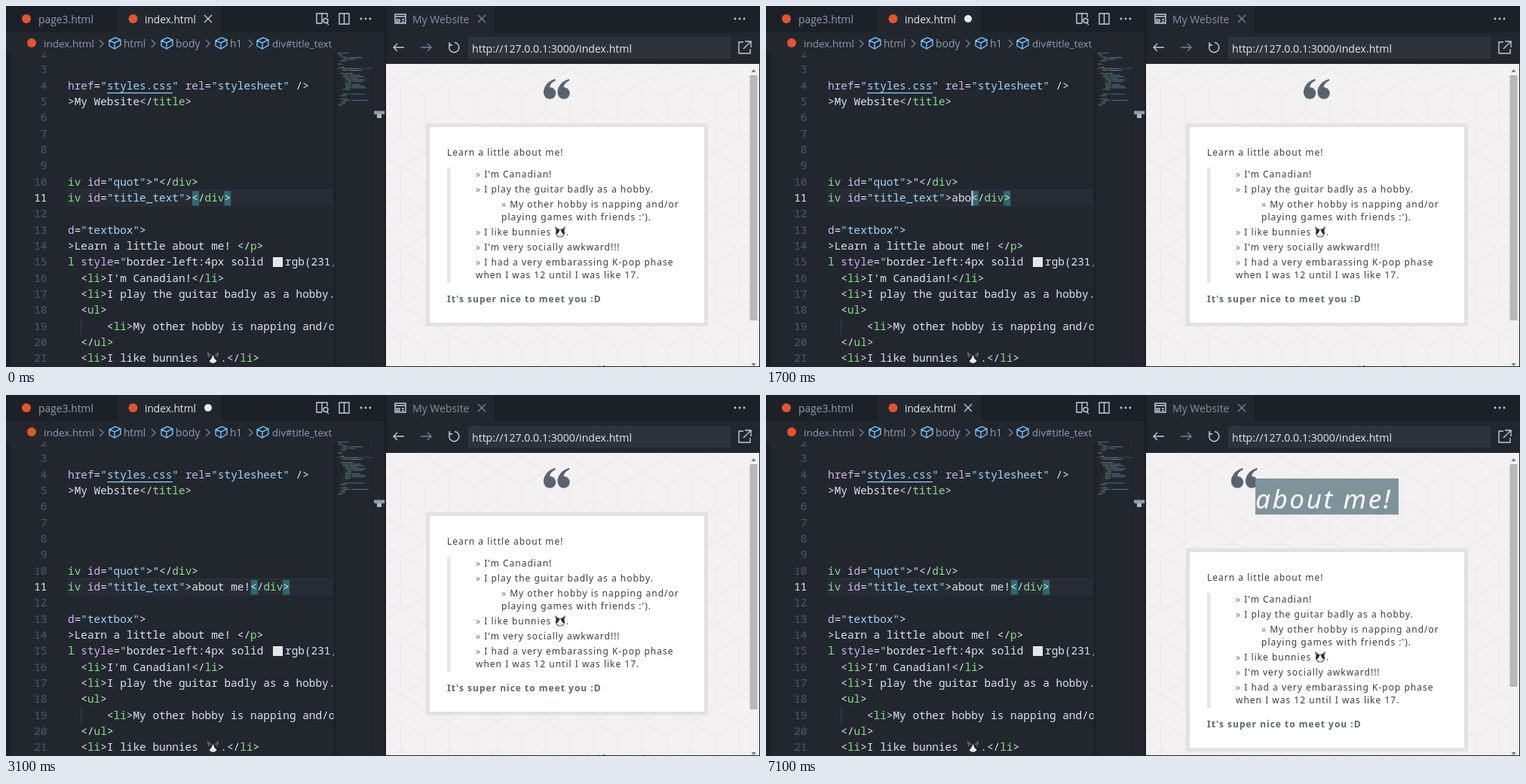
Write an HTML page that moves like this. It is 1000 by 480 pixels and loops after 7.2 s.

```html
<!DOCTYPE html>
<html lang="en">
<head>
<meta charset="utf-8">
<title>Live preview</title>
<style>
html, body { margin: 0; width: 100%; height: 100%; overflow: hidden; background: #1c2128; }
svg { display: block; width: 1000px; height: 480px; }
text { white-space: pre; }
.mono { font: 500 14.42px "Noto Sans Mono", monospace; fill: #dce4ec; }
.num { fill: #4f5862; text-anchor: end; font-weight: 400; }
.tag { fill: #8ddb8c; }
.attr { fill: #d6b4f5; }
.str { fill: #a2d5fc; }
.ui { font-family: "Open Sans", sans-serif; fill: #929ca8; }
.page { font: 12px "Noto Sans", sans-serif; letter-spacing: 1px; fill: #3b3d42; }
.strong { font-weight: 700; fill: #60656e; }
.icon { fill: none; stroke: #c3ccd6; stroke-width: 1.4; }
.dim { stroke: #768390; }
</style>
</head>
<body>
<svg id="stage" viewBox="0 0 1000 480"></svg>
<script>
const LOOP = 7200, CHAR = 8.65, ROW = 21.33, CODE_X = 82, TYPE_X = 247;
const stage = document.getElementById('stage');

const rect = (x, y, w, h, fill, extra = '') =>
  `<rect x="${x}" y="${y}" width="${w}" height="${h}" fill="${fill}" ${extra}/>`;
const text = (x, y, str, cls, extra = '') =>
  `<text x="${x}" y="${y}" class="${cls}" ${extra}>${str}</text>`;
const icon = (d, cls = '', extra = '') => `<path d="${d}" class="icon ${cls}" ${extra}/>`;
const label = (x, y, str, size, fill = '#929ca8') =>
  text(x, y, str, 'ui', `style="font-size:${size}px;fill:${fill}"`);
const group = (id, body, extra = '') => `<g id="${id}" ${extra}>${body}</g>`;
const baseline = line => 110.7 + (line - 4) * ROW;
const escape = s => s.replace(/</g, '&lt;');

function highlight(line) {
  return escape(line)
    .replace(/("[^"]*"|"(?=border))|(&lt;\/?)(\w+)|^(iv|l)(?= )|(\w+)(?==")/g,
      (all, str, open, tag, cutTag, attr) =>
        str ? `<tspan class='str'>${str}</tspan>` :
        tag ? `${open}<tspan class='tag'>${tag}</tspan>` :
        cutTag ? `<tspan class='tag'>${cutTag}</tspan>` :
        `<tspan class='attr'>${attr}</tspan>`);
}

const bunny = (x, y) => `<g transform="translate(${x} ${y})">
  <path d="M-5 0L-7-7L-2-3ZM5 0L7-7L2-3Z" fill="#3a3437" stroke="#a39698" stroke-width=".8"/>
  <ellipse cy="2" rx="6" ry="5.5" fill="#2a272b"/>
  <path d="M0-4L2 1L5 4Q0 10-5 4L-2 1Z" fill="#f4f2f2"/>
  <path d="M-1 4h2l-1 1.5z" fill="#bb8b91"/></g>`;

const cross = (x, y, cls) => icon(`M${x - 5} ${y - 5}l10 10m0-10l-10 10`, cls);
const dots = (x, y) => [-6, 0, 6].map(d => `<circle cx="${x + d}" cy="${y}" r="1.4" fill="#c3ccd6"/>`).join('');
const badge = (x, y) => `<circle cx="${x}" cy="${y}" r="6" fill="#e5532d"/>`;
const cube = x => icon(`M${x - 7} 46l8-4l7 3v7l-8 5l-7-4zl7 3l8-4m-8 4v8`, '', 'style="stroke:#75beff"');
const chevron = x => icon(`M${x - 3} 45l5 5l-5 5`, 'dim');

function editor() {
  const lines = {
    4: 'href="styles.css" rel="stylesheet" />',
    5: '>My Website</title>',
    10: 'iv id="quot">“</div>',
    13: 'd="textbox">',
    14: '>Learn a little about me! </p>',
    15: 'l style="border-left:4px solid ',
    16: "  <li>I'm Canadian!</li>",
    17: '  <li>I play the guitar badly as a hobby.</li>',
    18: '  <ul>',
    19: '      <li>My other hobby is napping and/or',
    20: '  </ul>',
    21: '  <li>I like bunnies '
  };
  let out = rect(0, 0, 504, 480, '#22272e') + rect(0, 62, 6, 418, '#1c2128');
  let code = rect(CODE_X, 244.5, 360, 21.5, '#272c34', 'stroke="#2c323a"');
  for (const n in lines) code += text(CODE_X, baseline(n), highlight(lines[n]), 'mono');
  code += text(370, baseline(15), 'rgb(231,', 'mono') + rect(354, 334, 13, 13, '#e7e7e7');
  code += bunny(274.5, 468) + text(284.3, baseline(21), highlight('.</li>'), 'mono');
  code += rect(134, 115, 87, 1.2, '#96d0ff') + rect(99, 416, 1, 21, '#3a414a');
  code += group('typing', '');
  let numbers = '';
  for (let n = 2; n <= 21; n++) {
    numbers += text(54.5, baseline(n), n, 'mono num', n === 11 ? 'style="fill:#e3e9ef"' : '');
  }
  out += `<g clip-path="url(#codeClip)">${numbers}${code}</g>`;
  return out + minimap();
}

function minimap() {
  const indents = [0, 0, 1, 2, 2, 1, 0, 0, 0, 1, 2, 2, 0, 1, 2, 2, 3, 3, 4, 3, 3, 3, 3, 2, 2, 0, 2, 1, 0, 1, 2, 1, 1, 0];
  const widths = [16, 6, 7, 28, 17, 8, 0, 7, 0, 6, 22, 27, 0, 18, 25, 30, 18, 28, 22, 8, 21, 27, 29, 10, 0, 0, 30, 8, 0, 10, 36, 8, 7, 6];
  const colors = ['#557a5e', '#526e85', '#6b7580'];
  let out = rect(435, 62, 1, 418, '#1a1e24') + rect(436, 62, 3, 418, '#1e2329') +
    rect(439, 82, 49, 2, '#2c3b4a');
  widths.forEach((w, i) => {
    const x = 440 + indents[i] * 3.3, y = 62 + i * 2.1;
    out += rect(x, y, w * .28, 1, colors[0]) + rect(x + w * .32, y, w * .62, 1, colors[1 + i % 2]);
  });
  return out + rect(487, 62, 1, 418, '#1c2128') + rect(488, 62, 15, 166, '#373e47', 'id="slider" opacity=".5"') +
    rect(488, 139.5, 14.5, 4.5, '#939daa') + rect(492, 144, 6, 5, '#adbac7') +
    rect(502.5, 0, 1.5, 480, '#171b20');
}

function editorHeader() {
  return rect(0, 0, 503, 35, '#1c2128') + rect(148, 0, 138, 35, '#22272e') +
    badge(27, 17) + label(43, 22.5, 'page3.html', 13.85) +
    badge(168.5, 17) + label(184, 22.5, 'index.html', 13.7, '#e3e9ef') +
    group('clean', cross(268, 17, '')) +
    '<circle id="dirty" cx="268" cy="17" r="5" fill="#e3e9ef"/>' +
    icon('M419 23h-7V10h14v5M419 10v13M425 22l3 3') +
    '<circle cx="424" cy="19.500" r="3" class="icon"/>' +
    icon('M442 10h13v14h-13zM448.500 10v14') + dots(477, 17) +
    badge(34, 49) + label(50, 54.5, 'index.html', 13.5) +
    [127, 196, 268, 325].map(chevron).join('') + [144, 213, 285, 340].map(cube).join('') +
    label(156, 54.5, 'html', 13.6) + label(225, 54.5, 'body', 13.9) + label(297, 54.5, 'h1', 13.6) +
    `<g clip-path="url(#crumbClip)">${label(353, 54.5, 'div#title_text', 13.2)}</g>`;
}

function browserHeader() {
  return rect(504, 0, 496, 35, '#1c2128') + rect(504, 0, 144, 35, '#22272e') +
    rect(504, 35, 496, 42, '#22272e') + rect(613, 41, 348, 29, '#2d323b') +
    icon('M516 11h14v12h-14zM516 14h14M518 18h4v3h-4zM525 18h3m-3 3h3', '', 'stroke-width="1.8"') +
    label(539, 22.5, 'My Website', 14, '#858f9b') + cross(631, 17, 'dim') + dots(973, 17) +
    icon('M528 55h-14m5-5l-5 5l5 5') + icon('M550 55h14m-5-5l5 5l-5 5', 'dim') +
    icon('M589.500 50.500A6.600 6.600 0 1 0 595 48.500M588 48v4h4') +
    label(618, 62, 'http://127.0.0.1:3000/index.html', 14.1, '#e3e9ef') +
    icon('M978 48h-6v15h15v-6M980 47h8v8M988 47l-10 10');
}

const quoteMark = x => `<path transform="translate(${x} 97)" fill="#5b6370"
  d="M15 0Q5 3 1 12Q-2 20 3 25Q7 28 12 26Q17 23 16 17Q14 11 8 11Q9 5 16 2Z"/>`;

function card() {
  const items = [
    [623, 228, "» I'm Canadian!"],
    [623, 248, '» I play the guitar badly as a hobby.'],
    [657, 268, '» My other hobby is napping and/or'],
    [657, 285, 'playing games with friends :\').'],
    [623, 304.5, '» I like bunnies'],
    [623, 325, "» I'm very socially awkward!!!"],
    [623, 345, '» I had a very embarassing K-pop phase'],
    [623, 361.5, 'when I was 12 until I was like 17.']
  ];
  return rect(559.5, 158.5, 369, 265, '#fff', 'stroke="#e3e2e3" stroke-width="5"') +
    rect(585, 215, 4.5, 153, '#e7e7e7') +
    text(585, 199, 'Learn a little about me!', 'page') +
    items.map(([x, y, s]) => text(x, y, s.replace('»', '<tspan fill="#777">»</tspan>'), 'page')).join('') +
    bunny(735, 300) + text(743, 304.5, '.', 'page') +
    text(585, 394, "It's super nice to meet you :D", 'page strong');
}

function page() {
  return rect(504, 77, 495, 403, '#f3f1f2') + rect(504, 77, 481, 403, 'url(#cubes)') +
    group('before', quoteMark(713) + quoteMark(731.5) +
      rect(786, 478.5, 2, 1, '#777') + rect(792, 478, 2, 1.5, '#666') + rect(846, 478.5, 2, 1, '#777')) +
    group('after', quoteMark(617) + quoteMark(636) + rect(649, 111, 190, 48, '#7f939c') +
      text(649, 151, 'about me!', 'page', 'style="font-size:35px;font-style:italic;letter-spacing:2.6px;fill:#fff"')) +
    group('card', card()) +
    rect(985.5, 77, 13.5, 403, '#f1f1f1') + rect(986.5, 92, 10, 326, '#b8b8b8', 'id="thumb"') +
    '<path d="M988.500 88l3-4l3 4zM988.500 475l3 4l3-4z" fill="#777"/>' +
    rect(999, 77, 1, 403, '#1c2128') + rect(504, 479, 496, 1, '#1c2128');
}

function menu() {
  const names = ['menu', 'menu:c', 'menu:context', 'menu:t', 'menu:toolbar', 'meta',
    'meta:compat', 'meta:desc', 'meta:edge', 'meta:kw'];
  const wrench = y => icon(`M319 ${y + 5}l6-6q-1-4 2-6q2-1 4-.500l-3 3l3 3l3-3q1 5-3 6.500q-2 .500-3 0l-6 6q-2 1-3-.500t0-2.500z`);
  return rect(311, 264, 676, 220, '#000', 'opacity=".18"') +
    rect(314.5, 266, 669, 220, '#1e2329', 'stroke="#3a414a"') + rect(315, 267, 668, 22, '#353b45') +
    names.map((name, i) => {
      const y = 278 + i * ROW;
      return wrench(y) + text(339, y + 5, `<tspan fill="#539bf5" font-weight="700">me</tspan>${name.slice(2)}`, 'mono');
    }).join('') +
    text(838, 282.5, 'Emmet Abbreviation', 'mono', 'style="font-size:12.3px;fill:#bcc6d0"');
}

stage.innerHTML = `<defs>
  <clipPath id="codeClip"><rect x="0" y="62" width="434.5" height="418"/></clipPath>
  <clipPath id="crumbClip"><rect x="353" y="36" width="84" height="26"/></clipPath>
  <pattern id="cubes" x="524" y="84" width="64" height="111" patternUnits="userSpaceOnUse">
    <path d="M0 18L32 0L64 18V55L32 74L0 55ZM0 18L32 37L64 18M32 37V74M32 74V111M0 55V92L32 111L64 92V55M0 92L32 74L64 92"
      fill="none" stroke="#eeecee" stroke-width="1.600"/>
  </pattern></defs>` +
  editor() + editorHeader() + page() + browserHeader() + group('menu', menu());

const parts = Object.fromEntries(['typing', 'slider', 'clean', 'dirty', 'before', 'after', 'card', 'thumb', 'menu']
  .map(id => [id, document.getElementById(id)]));
const show = (part, on) => part.setAttribute('display', on ? 'inline' : 'none');

// [time, number of typed characters]
const keys = [[1600, 1], [1700, 3], [1800, 4], [1900, 5], [2000, 6], [2300, 7], [2400, 8], [2600, 9]];
const SAVED = 3600;

function cursorVisible(t) {
  if (t >= 1600 && t < 3100) return true;
  const start = t < 1600 ? 1 : 601;
  return (t - start + LOOP - 200) % 1000 < 499;
}

function typedLine(t) {
  const count = keys.reduce((n, [at, c]) => t >= at ? c : n, 0);
  const x = TYPE_X + count * CHAR;
  const bracket = at => rect(at, 246, 9, 19.5, '#2d6a70');
  const line = 'iv id="title_text">' + 'about me!'.slice(0, count) + '</div>';
  return bracket(x) + bracket(x + 5 * CHAR - 1) + text(CODE_X, baseline(11), highlight(line), 'mono') +
    (cursorVisible(t) ? rect(x - .5, 245.5, 2, 20, '#cdd9e5') : '');
}

let drawn = -1;
function draw(now) {
  const t = Math.floor(now % LOOP / 100) * 100;
  if (t !== drawn) {
    drawn = t;
    const saved = t >= SAVED;
    const dirty = t >= 1600 && !saved;
    parts.typing.innerHTML = typedLine(t);
    show(parts.dirty, dirty);
    show(parts.clean, !dirty);
    show(parts.before, !saved);
    show(parts.after, saved);
    show(parts.menu, t >= 2400 && t < 2600);
    show(parts.slider, t >= 100 && t < 1700);
    parts.card.setAttribute('transform', `translate(0 ${saved ? 48 : 0})`);
    parts.thumb.setAttribute('height', saved ? 296 : 326);
  }
  requestAnimationFrame(draw);
}
requestAnimationFrame(draw);
</script>
</body>
</html>
```
